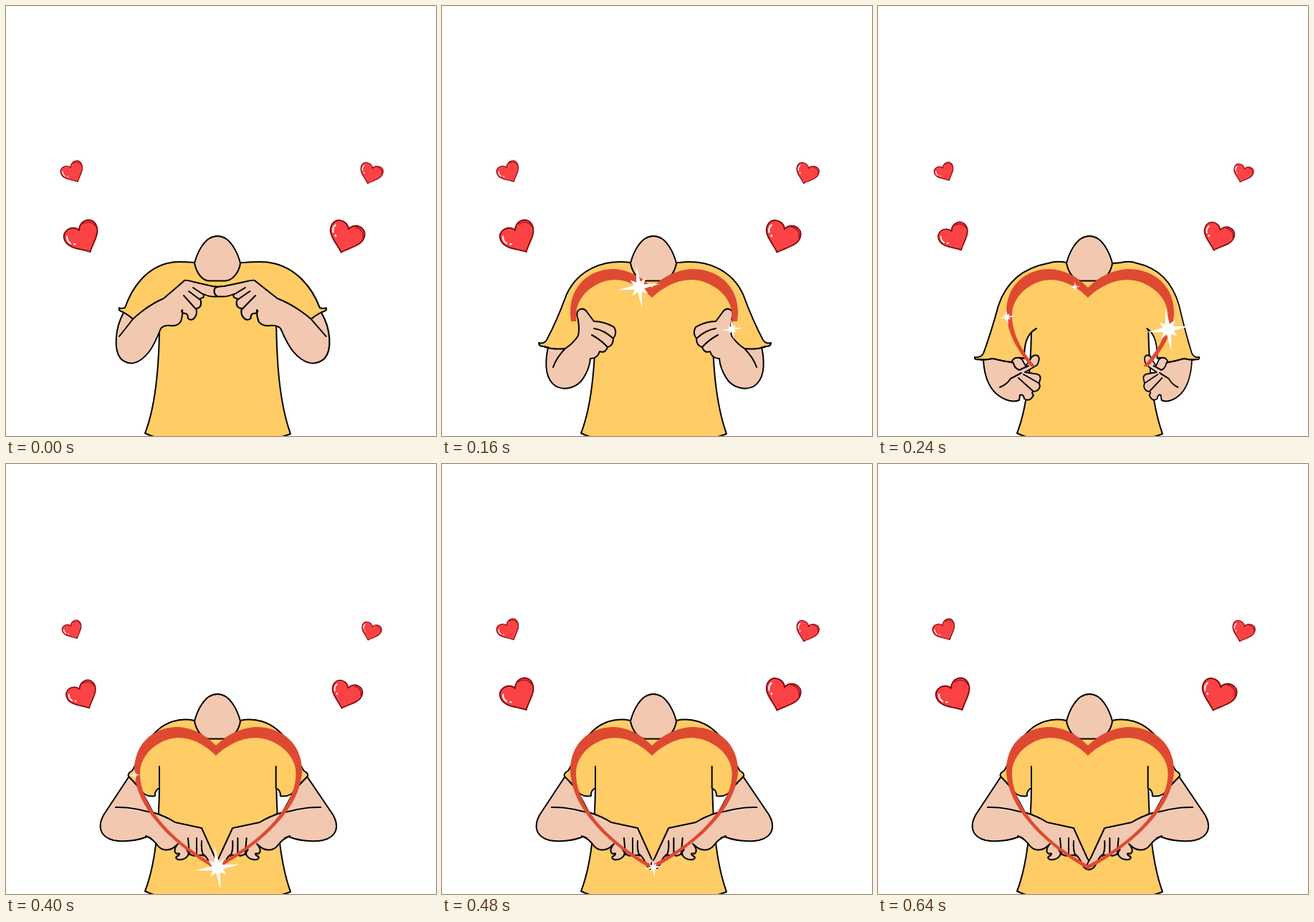
These frames come from a looping animation (600 by 600 pixels, 720 ms). An HTML page with a canvas:

```html
<!DOCTYPE html>
<html lang="en">
<head>
<meta charset="utf-8">
<title>Drawing a heart</title>
<style>
html, body { margin: 0; width: 100%; height: 100%; overflow: hidden; background: #fff; }
canvas { display: block; }
</style>
</head>
<body>
<canvas id="stage" width="600" height="600"></canvas>
<script>
const ctx = document.getElementById('stage').getContext('2d');
const STEP = 80, STEPS = 9;
const YELLOW = '#ffcc66', SKIN = '#f2c8b0', RED = '#de4a31', INK = '#000';

const sides = 'M214 422C215 500 208 560 194 596Q205 602 230 606H360Q385 602 397 597C382 555 377 500 377 422';
const head = 'M295 321C276 321 266 347 263 359C266 373 274 383.500 284 383.500H305C316 383.500 325 372 327 359C324 347 314 321 295 321Z';
const ribbon = 'M293 393C275 374 255 367 237 367C206 368 178 390 179 430C182 480 230 530 294 566' +
  'V560C235 529 187 478 187 432C187 404 214 383 240 382C262 382 280 394 293 407Z';
const smallHeart = 'M0 -9C-4 -20 -23 -20 -23 -5C-23 7 -8 14 0 23C8 14 23 7 23 -5C23 -20 4 -20 0 -9Z';

// Left half of each pose; the right half is x -> shift - scale * x.
const poses = [
  { shift: 619.6, scale: 1.095,
    sleeve: 'M285 358L263 358Q240 356 230 358C195 364 175 395 166 421Q161 423 158 421Q156 425 163 427Q172 432 177 437',
    arm: 'M164 428C152 450 150 480 160 492C172 503 186 500 200 482C206 474 212 460 216 450' +
      'Q220 445 230 446Q240 447 244 440Q247 430 246 424Q243 428 250 429Q254 429 254 436Q260 441 265 432' +
      'Q267 426 265 422Q273 422 272 412Q270 408 272 408Q277 407 276 402Q285 407 297 405Q302 401 300 394' +
      'Q297 391 288 391L262 385Q250 382 249 383C238 393 228 401 220 408C195 419 178 436 177 437' +
      'M177 437L158 461M163 427Q172 432 177 437M261 393L276 403M255 398L271 410M248 404L265 423' },
  { shift: 598, scale: 1,
    sleeve: 'M285 360L263 358C235 356 190 365 176 395Q163 425 152 441Q149 447 144 446Q143 450 148 451Q160 457 170 457',
    arm: 'M154 453C147 480 147 500 160 512C172 521 186 520 196 507C206 492 213 475 213 458' +
      'Q222 459 227 450Q229 444 228 439Q223 439 224 436Q230 434 233 439Q237 438 236 444Q243 452 249 444' +
      'Q251 436 249 432Q258 433 258 424Q256 420 258 418Q263 410 258 404Q244 399 227 402Q236 393 246 388' +
      'Q259 384 259 375Q258 369 252 369L238 383Q227 390 222 397Q213 415 207 420C190 431 180 445 170 457' +
      'M170 457Q160 471 155 485M148 451Q160 457 170 457M233 409Q246 408 258 418M230 417Q240 422 249 432',
    tip: 'M249 369Q256 367 259 372' },
  { shift: 594, scale: 1,
    sleeve: 'M285 358L263 358C225 353 190 368 174 402Q160 440 146 466Q142 472 135 470Q135 475 142 475Q155 480 172 478L214 470',
    arm: 'M148 476C143 500 144 520 158 530C172 538 190 532 198 518Q206 505 207 492Q217 492 220 482' +
      'Q228 485 231 476Q239 474 239 464Q245 456 240 448Q226 440 212 440L203 428Q198 420 191 424' +
      'Q186 428 190 438Q192 452 190 460Q184 470 172 478' +
      'M172 478Q160 490 155 504M142 475Q155 480 172 478M212 450Q226 452 239 464M209 459Q222 466 231 476' },
  { shift: 563, scale: 0.85,
    sleeve: 'M285 360L263 358Q250 355 237 359C205 365 180 382 168 418Q158 455 147 485Q143 491 135 490Q134 494 140 493' +
      'Q148 495 160 492Q180 497 188 497Q194 488 204 492C204 475 206 458 221 450',
    arm: 'M147 493C148 515 153 530 165 541C178 552 190 553 197 550L198 543Q203 541 204 548Q212 553 217 543' +
      'Q214 540 216 538Q225 538 226 530Q224 527 226 522Q229 514 218 513L205 511L222 501Q227 492 223 488' +
      'Q216 485 212 494L206 502L202 495Q200 490 192 491Q186 494 187 498' +
      'M170 532Q180 528 185 520L200 512M189 498Q190 505 197 508L210 502M203 514L224 526M196 519L217 538' +
      'M140 493Q148 495 160 492Q180 497 188 497' },
  { shift: 596, scale: 1.025,
    sleeve: 'M285 358L263 358C240 353 222 362 212 371C190 390 185 415 176 428Q169 432 171 436Q185 450 192 460' +
      'Q200 465 208 463Q207 456 214 452M214 422V452',
    arm: 'M171 437L136 490C128 505 130 520 150 525C165 528 185 525 197 520Q205 523 213 534Q222 542 233 536' +
      'L240 530Q232 540 238 544Q244 542 241 546Q234 549 240 552Q250 553 254 546Q256 540 252 538' +
      'Q258 549 265 546Q274 546 276 545Q281 549 285 559Q290 568 297 565Q299 560 292 550L273 508L236 500' +
      'Q224 492 205 486L191 460M153 479C170 478 190 483 215 489M254 522L256 545M266 522V546' +
      'M273 526Q272 540 276 547M195 519L202 522M171 436Q185 450 192 460' }
];

// How much of the red ribbon is drawn so far
const reveal = [
  'M0 0', 'M245 360L237 384V410H363V384L352 360Z',
  'M0 0H600V440H0Z', 'M0 0H600V503H0Z', 'M0 0H600V600H0Z'
];

// x, y, first step, radius per step
const stars = [
  [275, 392, 1, [16, 30, 8]],
  [405, 451, 2, [15, 31, 7]],
  [180, 434, 3, [12, 32, 8]],
  [295, 563, 5, [31, 14, 7]]
];

// x, y, size, angle
const hearts = [
  [106.500, 321.500, 1.06, -27],
  [93, 231, 0.69, -27],
  [475, 320.500, 1.06, 18],
  [509.500, 232.500, 0.69, 18]
];

function shape(d, fill, stroke, width = 2) {
  const path = new Path2D(d);
  if (fill) { ctx.fillStyle = fill; ctx.fill(path); }
  if (stroke) { ctx.strokeStyle = stroke; ctx.lineWidth = width; ctx.stroke(path); }
}

function bothSides(shift, scale, draw) {
  draw();
  ctx.save();
  ctx.transform(-scale, 0, 0, 1, shift, 0);
  draw();
  ctx.restore();
}

function drawHeart(x, y, size, angle, pulse) {
  ctx.save();
  ctx.translate(x, y);
  ctx.rotate(angle * Math.PI / 180);
  ctx.scale(size * pulse, size * pulse);
  shape(smallHeart, '#fb4245', '#7d0b10', 1.8);
  shape('M8 -14.500Q20 -15 21.500 -4', null, '#a81820', 1.500);
  shape('M-18 -9Q-21 -4 -18 1M-13 5L-14 4', null, '#fff', 2);
  ctx.restore();
}

function drawStar(x, y, r) {
  ctx.beginPath();
  for (let i = 0; i < 16; i++) {
    const len = r * (i % 2 ? 0.25 : i % 4 ? 0.52 : 1);
    const a = i * Math.PI / 8 - 0.14;
    ctx.lineTo(x + len * Math.cos(a), y + len * Math.sin(a));
  }
  ctx.fillStyle = '#fff';
  ctx.fill();
}

function draw(step) {
  const index = Math.min(step, 4);
  const { shift, scale, sleeve, arm, tip } = poses[index];
  ctx.fillStyle = '#fff';
  ctx.fillRect(0, 0, 600, 600);
  ctx.lineJoin = ctx.lineCap = 'round';

  const pulse = step % 2 ? 0.875 : 1;
  for (const h of hearts) drawHeart(...h, pulse);

  shape(sides + 'L350 357H240Z', YELLOW);
  shape(sides, null, INK);
  bothSides(shift, scale, () => shape(sleeve, YELLOW, INK));
  shape(head, SKIN, INK);
  bothSides(shift, scale, () => shape(arm, SKIN, INK));

  ctx.save();
  ctx.clip(new Path2D(reveal[index]));
  bothSides(601.5, 1.053, () => shape(ribbon, RED));
  ctx.restore();
  if (tip) bothSides(shift, scale, () => shape(tip, null, INK));

  for (const [x, y, first, radii] of stars) {
    const r = radii[step - first];
    if (r) drawStar(x, y, r);
  }
}

function tick() {
  draw(Math.floor(performance.now() / STEP) % STEPS);
  requestAnimationFrame(tick);
}
tick();
</script>
</body>
</html>
```
